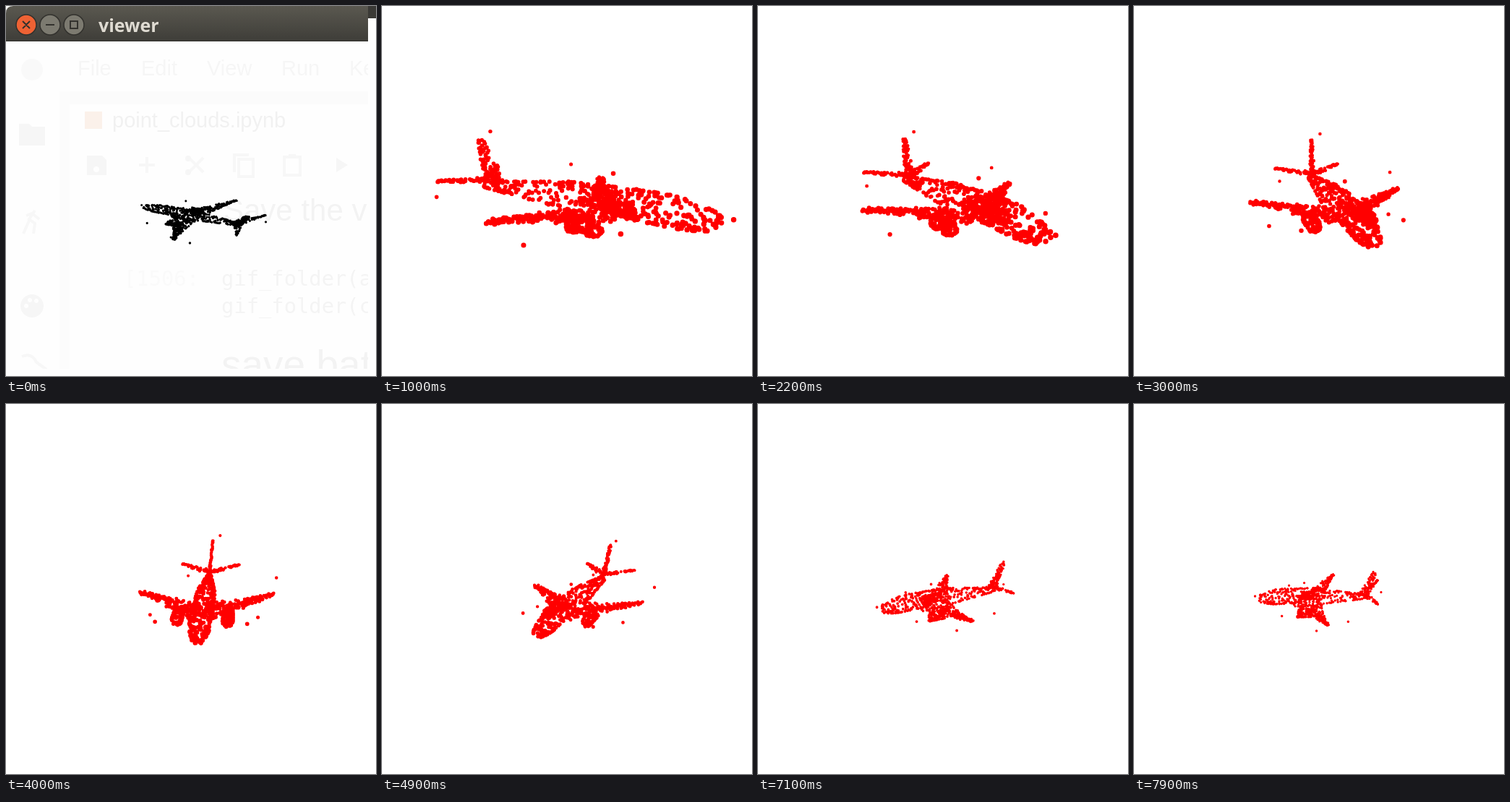
Recreate the animation shown at these times as an HTML page with a canvas. Size 512 by 512 pixels, loop 8000 ms.

```html
<!DOCTYPE html>
<html lang="en">
<head>
<meta charset="utf-8">
<title>viewer</title>
<style>
  html, body { margin: 0; width: 100%; height: 100%; overflow: hidden; background: #fff; }
  svg, canvas { position: absolute; left: 0; top: 0; width: 512px; height: 512px; display: block; }
  .ui { font-family: "Liberation Sans", Arial, sans-serif; font-size: 29px; }
  .mono { font-family: "DejaVu Sans Mono", monospace; font-size: 28.8px; }
  .title { font: 700 25px "Open Sans", "Noto Sans", sans-serif; fill: #dfdbd2; }
</style>
</head>
<body>
<svg id="desk" viewBox="0 0 512 512">
  <defs>
    <linearGradient id="bar" x1="0" y1="0" x2="0" y2="1">
      <stop offset="0" stop-color="#5a5850"/>
      <stop offset="1" stop-color="#3e3d38"/>
    </linearGradient>
    <clipPath id="win"><rect x="0" y="49" width="501" height="453"/></clipPath>
  </defs>
  <rect width="512" height="512" fill="#fefefe"/>
  <g class="ui" clip-path="url(#win)" fill="#f6f6f6">
    <rect x="74" y="118" width="427" height="18" fill="#fbfbfb"/>
    <rect x="74" y="118" width="14" height="394" fill="#fcfcfc"/>
    <text x="99" y="96">File</text>
    <text x="187" y="96">Edit</text>
    <text x="278" y="96">View</text>
    <text x="381" y="96">Run</text>
    <text x="475" y="96">Kernel</text>
    <text x="147" y="168" fill="#f1f1f1">point_clouds.ipynb</text>
    <rect x="109" y="146" width="24" height="24" fill="#fbf1ea"/>
    <circle cx="36" cy="88" r="15" fill="#f9f9f9"/>
    <path d="M18 163h14l4 4h18v26H18z"/>
    <g fill="none" stroke="#f7f7f7" stroke-width="4">
      <path d="M40 283l-8 12 8 6-2 14M32 297l-8 18M28 290l8-3 10 8"/>
      <path d="M195 209v22M184 220h22"/>
      <path d="M253 210l20 20M253 230l20-20"/>
      <path d="M322 212h20v24h-20zM316 230v-24h20"/>
      <path d="M385 209h22v25h-22zM391 207h10"/>
      <path d="M22 485q14-6 20 8l14 10"/>
    </g>
    <circle cx="252" cy="211" r="4"/><circle cx="252" cy="230" r="4"/>
    <path d="M112 207h21l6 6v21h-27z"/>
    <circle cx="125" cy="226" r="4" fill="#fefefe"/>
    <path d="M457 210l16 10-16 10z"/>
    <circle cx="36" cy="415" r="16"/>
    <g fill="#fefefe"><circle cx="28" cy="415" r="3"/><circle cx="33" cy="407" r="3"/><circle cx="42" cy="408" r="3"/></g>
    <text x="301" y="297" font-size="42" fill="#f3f3f3">Save the v</text>
    <text class="mono" x="163" y="387" fill="#fafafa">[1506:</text>
    <text class="mono" x="298" y="387" fill="#f4f4f4">gif_folder(a</text>
    <text class="mono" x="298" y="425" fill="#f4f4f4">gif_folder(c</text>
    <text x="298" y="515" font-size="55" fill="#f3f3f3">save bat</text>
  </g>
  <rect x="501" width="11" height="17" fill="#3b3a36"/>
  <path d="M0 49V10Q0 0 10 0H501V49z" fill="url(#bar)"/>
  <path d="M0 48.5H501" stroke="#32312d"/>
  <g stroke="#33322e" stroke-width="1.5">
    <circle cx="28" cy="26" r="14" fill="#ee6234"/>
    <circle cx="61" cy="26" r="14" fill="#7c7a70"/>
    <circle cx="94" cy="26" r="14" fill="#7c7a70"/>
    <path d="M23 21l10 10M33 21l-10 10M55 26h12M89 21h10v10h-10z" fill="none" stroke-width="2"/>
  </g>
  <text class="title" x="128" y="36">viewer</text>
</svg>
<canvas id="view" width="512" height="512"></canvas>
<script>
const ctx = document.getElementById('view').getContext('2d');
const desk = document.getElementById('desk');
const sin = deg => Math.sin(deg * Math.PI / 180);
const cos = deg => Math.cos(deg * Math.PI / 180);

let seed = 7;
const rnd = () => (seed = (seed * 16807) % 2147483647) / 2147483647;
const spread = w => (rnd() - 0.5) * w;
const cloud = [];
const add = (x, y, z) => cloud.push([x, y, z]);
const times = (n, fn) => { for (let i = 0; i < n; i++) fn(i % 2 ? 1 : -1); };

// Aircraft axes: x to the nose, y to the right wing, z up
function fuselage() {
  const x = -0.51 + rnd(), a = rnd() * 360;
  const nose = Math.max(0, (x - 0.3) / 0.2), tail = Math.max(0, (-0.1 - x) / 0.4);
  const rad = 0.37 - 0.27 * tail - 0.23 * nose * nose;
  const mid = (x < 0 ? 0.24 * x : 0.05) - 0.08 * nose;
  add(x, 0.18 * rad * cos(a), mid + rad * sin(a));
}
function wing(side) {
  const v = Math.pow(rnd(), 1.25);
  const chord = 0.24 * Math.pow(1 - v, 1.5) + 0.03;
  add(0.04 - 0.21 * v + spread(chord), side * (0.05 + 0.45 * v), -0.32 + 0.18 * v + spread(0.1));
}
function engine(side) {
  const a = rnd() * 360;
  add(0.06 + spread(0.13), side * (0.17 + 0.035 * cos(a)), -0.42 + 0.18 * sin(a));
}
function fin() {
  const v = rnd();
  add(-0.46 - 0.11 * v + spread(0.1 - 0.05 * v), spread(0.012), 1.2 * v);
}
function stabilizer(side) {
  const v = rnd();
  add(-0.48 - 0.13 * v + spread(0.09 * (1 - v) + 0.01), side * 0.245 * v, 0.05 + 0.09 * v + spread(0.05));
}
function strays(side) {
  add(-0.07, side * 0.385, -0.73);
  add(0.25, side * 0.29, -0.17);
}
times(350, fuselage);
times(330, wing);
times(200, engine);
times(56, fin);
times(90, stabilizer);
times(2, strays);
add(-0.65, 0.19, -0.43);
add(-0.345, -0.53, 0.13);
add(0.09, 0, 0.75);
add(-0.55, -0.06, 1.42);
add(0.53, 0, 0.1);

// tilt: height of the eye, lean: sideways roll, rise: height of the up axis
function draw({ x: cx, y: cy, yaw, size, tilt, lean, rise }, color) {
  const s = sin(yaw), c = cos(yaw);
  ctx.fillStyle = color;
  ctx.beginPath();
  for (const [x, y, z] of cloud) {
    const w = 0.7 * y;
    const k = size / (1 - size / 750 * (x * s + w * c));
    const px = cx + k * (x * c + w * (lean - s) + 0.012 * z);
    const py = cy + k * (0.85 * tilt * x * sin(yaw + 5) + w * tilt * c - rise * z);
    const r = k * (0.0065 + 0.7 / size);
    ctx.moveTo(px + r, py);
    ctx.arc(px, py, r, 0, Math.PI * 2);
  }
  ctx.fill();
}

// The plane turns evenly while it recedes and the eye climbs
function poseAt(n) {
  const yaw = 25 + 2.07 * n;
  return {
    yaw,
    x: 265 + 22 * cos(yaw - 30),
    y: 264 + 6.5 * sin(yaw - 10),
    size: 1000 / (2.6 + 0.0008 * n * n),
    tilt: 0.28 + 0.00008 * n * n,
    lean: 0.25 * Math.pow(n / 71, 4),
    rise: 0.136 + 0.000006 * n * n
  };
}
const intro = { x: 256, y: 289, yaw: 196, size: 138, tilt: 0.58, lean: 0.65, rise: 0.07 };

// One step per 100 ms, with a pause of one tick now and then
const stepAt = t => Math.floor((t - 500) / 100) - [600, 3200, 5800].filter(p => t >= p).length;

function render(now) {
  const t = now % 8000, start = t < 500;
  desk.style.visibility = start ? 'visible' : 'hidden';
  ctx.clearRect(0, 0, 512, 512);
  if (start) draw(intro, '#000');
  else draw(poseAt(stepAt(t)), '#f00');
}
function tick() {
  render(performance.now());
  requestAnimationFrame(tick);
}
tick();
</script>
</body>
</html>
```
